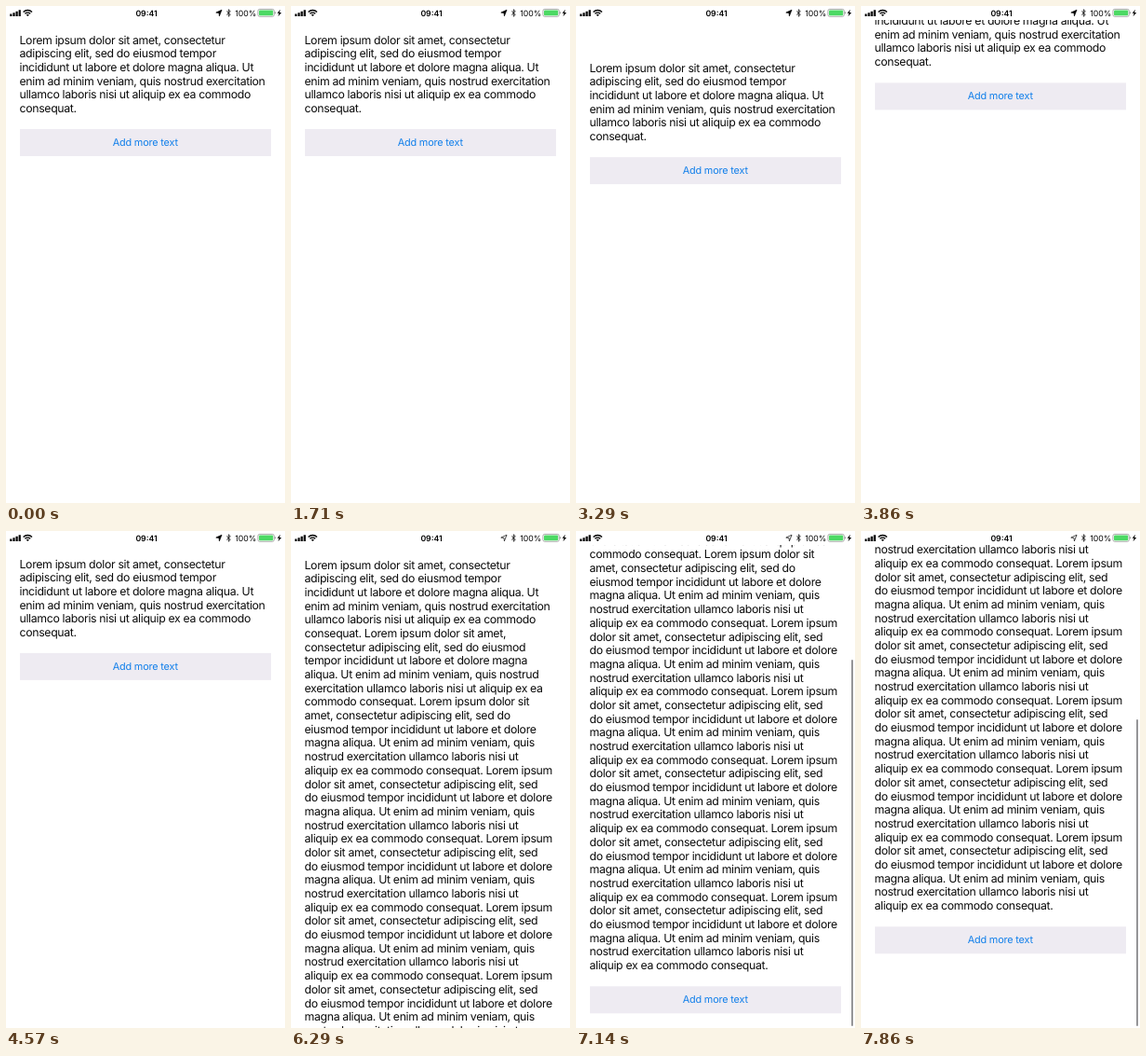
An HTML page for the animation above (8 s loop, 300x533 px).

```html
<!DOCTYPE html>
<html lang="en">
<head>
<meta charset="utf-8">
<title>Scrolling label</title>
<style>
  html, body { margin: 0; width: 100%; height: 100%; overflow: hidden; background: #fff; }
  body { position: relative; font-family: Inter, sans-serif; color: #0c0c0c;
    text-rendering: geometricPrecision; }
  #view { position: absolute; inset: 14.5px 0 0 0; overflow: hidden; }
  #page { position: absolute; left: 14.5px; top: 14.5px; width: 270.6px; }
  #label, #title { position: relative; top: .55px; }
  #label { font-size: 12.32px; line-height: 14.69px; letter-spacing: -.028em; white-space: pre; }
  #button { margin-top: 14.5px; height: 29px; line-height: 29px; background: #eeebf2;
    color: #0f7eea; font-size: 10.87px; letter-spacing: -.016em; text-align: center; }
  #bar { position: absolute; left: 296.1px; width: 2px; border-radius: 1px; background: #959597; }
  #status { position: absolute; left: 0; top: 0; width: 300px; height: 15px; }
  #status text { font-size: 8.7px; }
</style>
</head>
<body>
<div id="view">
  <div id="page">
    <div id="label"></div>
    <div id="button"><span id="title">Add more text</span></div>
  </div>
</div>
<div id="bar"></div>
<svg id="status" viewBox="0 0 300 15">
  <path d="M4.2 8.4h2.2v2.5h-2.2zM7.4 7.2h2.2v3.7h-2.2zM10.5 5.8h2.2v5.1h-2.2zM13.6 4.2h2.2v6.7h-2.2z"/>
  <g fill="none" stroke="#000" stroke-width="1.4">
    <path d="M18.6 6.5a6.6 6.6 0 0 1 9.4 0M20.4 8.3a4.1 4.1 0 0 1 5.8 0"/>
  </g>
  <path d="M23.3 11.1l-1.6-1.7a2.3 2.3 0 0 1 3.2 0z"/>
  <text x="151" y="10.7" text-anchor="middle" font-weight="600">09:41</text>
  <path id="arrow" d="M232 4.2L229.4 10.8L229 7.4L225.8 7.1Z" stroke="#000" stroke-width=".7" stroke-linejoin="round"/>
  <path d="M237.3 5.6l4 3.7-2 1.9v-7.4l2 1.9-4 3.7" fill="none" stroke="#000" stroke-width=".8"/>
  <text x="246.3" y="10.7">100%</text>
  <rect x="270.9" y="3.4" width="17.4" height="7.9" rx="1.9" fill="#fff" stroke="#888" stroke-width=".7"/>
  <rect x="272" y="4.5" width="15.2" height="5.7" rx="1" fill="#4cd964"/>
  <path d="M289.2 6v2.7q1-.4 1-1.35t-1-1.35z" fill="#888"/>
  <path d="M295 3.8l-3.4 4h2l-1 3.4 3.6-4.2h-2.1z"/>
</svg>
<script>
const LOOP = 8000, STEP = 1000 / 7;
const $ = id => document.getElementById(id);
const [label, page, title, bar, arrow] = ['label', 'page', 'title', 'bar', 'arrow'].map($);

const opening = [
  'Lorem ipsum dolor sit amet, consectetur',
  'adipiscing elit, sed do eiusmod tempor',
  'incididunt ut labore et dolore magna aliqua. Ut',
  'enim ad minim veniam, quis nostrud exercitation',
  'ullamco laboris nisi ut aliquip ex ea commodo',
  'consequat.'
];
const closing = [
  'magna aliqua. Ut enim ad minim veniam, quis',
  'nostrud exercitation ullamco laboris nisi ut',
  'aliquip ex ea commodo consequat.'
];
const cycle = [
  ' Lorem ipsum',
  'dolor sit amet, consectetur adipiscing elit, sed',
  'do eiusmod tempor incididunt ut labore et dolore',
  ...closing
].join('\n');
const shortText = opening.join('\n');
const longText = shortText + [
  ' Lorem ipsum dolor sit amet,',
  'consectetur adipiscing elit, sed do eiusmod',
  'tempor incididunt ut labore et dolore magna',
  'aliqua. Ut enim ad minim veniam, quis nostrud',
  'exercitation ullamco laboris nisi ut aliquip ex ea',
  'commodo consequat. Lorem ipsum dolor sit',
  'amet, consectetur adipiscing elit, sed do',
  'eiusmod tempor incididunt ut labore et dolore',
  ...closing
].join('\n') + cycle.repeat(5);

// [time, content shift]
const drag = [
  [1900, 0], [2000, 3], [2140, 10], [2290, 26], [2430, 46], [2570, 66], [2710, 81.6],
  [2860, 90], [3000, 78], [3140, 56], [3430, 6], [3570, -18], [3710, -37],
  [3860, -49.6], [4000, -50]
];
const scroll = [
  [6290, 0], [6430, -22], [6570, -65], [6710, -104], [6860, -133], [7000, -151],
  [7140, -157.7], [7290, -159], [7430, -167], [7570, -187], [7710, -208], [7860, -221.7]
];

function along(points, t) {
  const i = points.findIndex(p => p[0] >= t);
  if (i < 0) return points[points.length - 1][1];
  if (i === 0) return points[0][1];
  const [t0, y0] = points[i - 1], [t1, y1] = points[i];
  return y0 + (y1 - y0) * (t - t0) / (t1 - t0);
}

function shiftAt(t) {
  if (t >= 5500) return along(scroll, t);
  if (t <= 4000) return along(drag, t);
  const u = (t - 4000) / 100;
  return -50 * (1 + u) * Math.exp(-u); // critically damped return
}

function drawBar(t, shift) {
  const END = 157.5, y = -shift;
  const top = 17 + Math.min(y, END) * .764 + Math.max(0, y - END);
  bar.style.top = top + 'px';
  bar.style.height = Math.min(531, top + 394) - top + 'px';
  bar.style.opacity = t > 6400 ? 1 : 0;
}

let shown;
function render(now) {
  // the picture advances seven times a second, on 10 ms ticks
  const k = Math.floor((now % LOOP + 5) / STEP) % 56;
  const t = Math.round(k * STEP / 10) * 10;
  if (k !== shown) {
    shown = k;
    const long = t >= 5570, shift = shiftAt(t);
    const text = long ? longText : shortText;
    if (label.textContent !== text) label.textContent = text;
    page.style.transform = `translateY(${shift}px)`;
    title.style.opacity = t >= 5430 && !long ? .3 : 1;
    arrow.setAttribute('fill', t >= 6000 ? '#fff' : '#000');
    drawBar(t, shift);
  }
}

const start = performance.now();
function tick() {
  render(performance.now() - start);
  requestAnimationFrame(tick);
}
tick();
</script>
</body>
</html>
```
